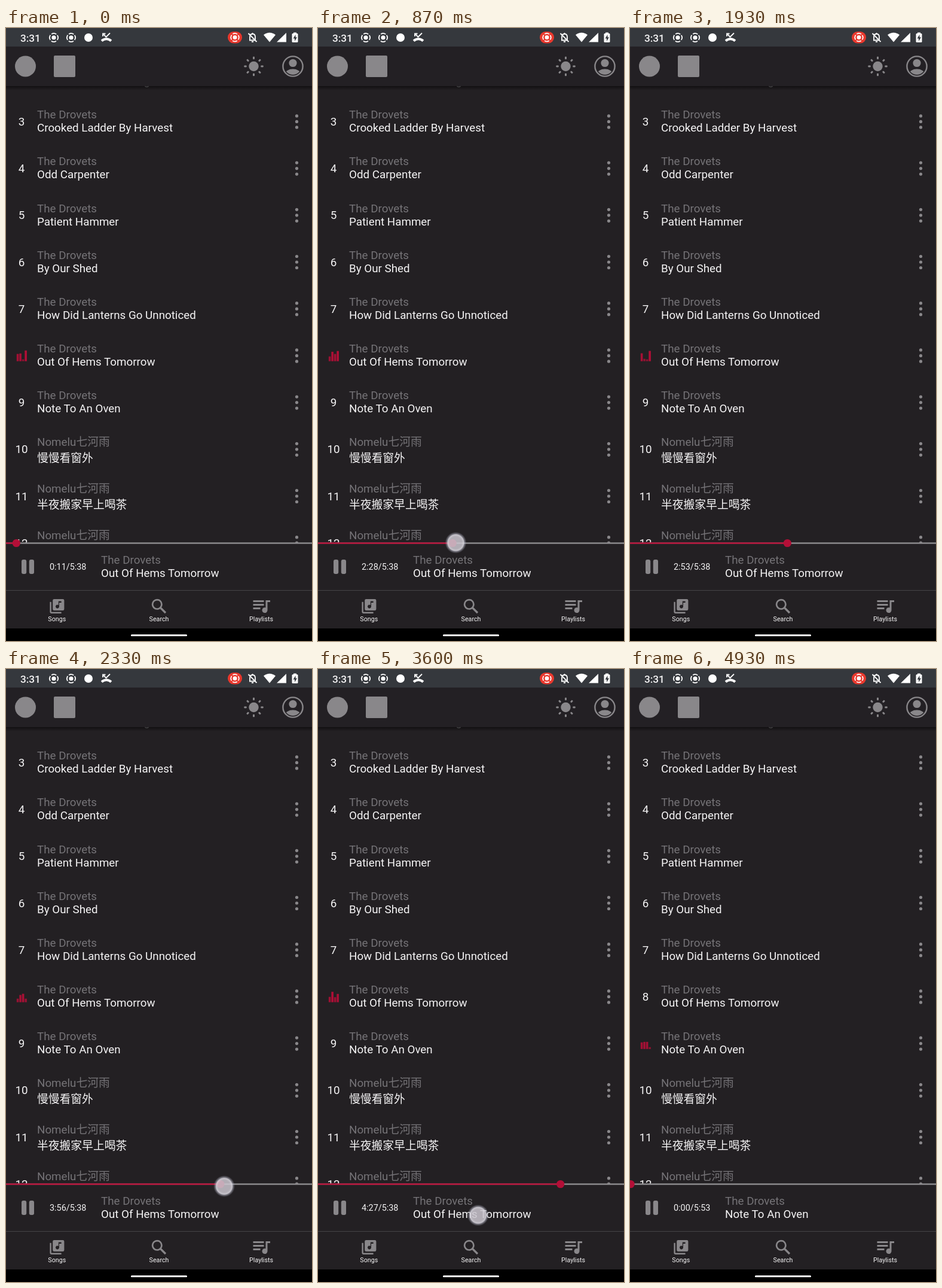
An HTML page that plays this animation: 512 px wide and 1024 px high, repeating every 4.99 s.

```html
<!DOCTYPE html>
<html lang="en">
<head>
<meta charset="utf-8">
<title>Music player</title>
<style>
  html, body { margin: 0; width: 100%; height: 100%; overflow: hidden; background: #232023; }
  svg { display: block; width: 100vw; height: 100vh; }
  text { font: 18.8px Roboto, "Noto Sans CJK SC", "Noto Sans CJK", sans-serif; fill: #f5f4f5; }
  .artist { fill: #757377; }
  .mid { text-anchor: middle; }
  .nav { font-size: 10.7px; text-anchor: middle; }
  .grey { fill: #89878a; }
  .line { fill: none; stroke: #fff; stroke-width: 1.8; }
  .red { fill: #b30f37; }
</style>
</head>
<body>
<svg viewBox="0 0 512 1024">
  <defs>
    <linearGradient id="shade" x2="0" y2="1">
      <stop stop-color="#000" stop-opacity=".5"/>
      <stop offset="1" stop-color="#000" stop-opacity="0"/>
    </linearGradient>
    <radialGradient id="glow">
      <stop offset=".55" stop-color="#cbc6cf" stop-opacity=".85"/>
      <stop offset=".74" stop-color="#dedbe3" stop-opacity=".88"/>
      <stop offset=".8" stop-color="#c4c3d0" stop-opacity=".6"/>
      <stop offset="1" stop-color="#9a9cb0" stop-opacity="0"/>
    </radialGradient>
    <clipPath id="face"><circle cx="480" cy="64" r="14"/></clipPath>
    <g id="recorder">
      <circle class="line" r="7" stroke-dasharray="8.5 2.5" transform="rotate(-35)"/>
      <circle r="3.6" fill="#fff"/>
    </g>
  </defs>

  <rect width="512" height="1024" fill="#232023"/>
  <text x="230.5" y="95" class="artist">g</text>
  <g id="rows"></g>
  <g id="bars" class="red"></g>

  <!-- header -->
  <rect y="97" width="512" height="7" fill="url(#shade)"/>
  <rect y="31" width="512" height="66" fill="#232024"/>
  <g class="grey">
    <circle cx="32.5" cy="64" r="17.5"/>
    <rect x="80" y="46" width="36" height="36" rx="2"/>
    <circle cx="414.5" cy="64" r="8.2"/>
    <g id="rays"></g>
    <circle cx="480" cy="64" r="16.6" fill="none" stroke="#89878a" stroke-width="2.4"/>
    <circle cx="480" cy="58.5" r="6.6"/>
    <ellipse cx="480" cy="77" rx="13" ry="8.5" clip-path="url(#face)"/>
  </g>

  <!-- status bar -->
  <rect width="512" height="31" fill="#35383d"/>
  <text x="24" y="22.5" style="font-size:17.2px;font-weight:500">3:31</text>
  <use href="#recorder" x="80" y="16"/>
  <use href="#recorder" x="109" y="16"/>
  <circle cx="138" cy="16" r="7" fill="#fff"/>
  <path class="line" d="M162 14V9.500h4.500M162.500 10l5 5 6.500-6.500"/>
  <path class="line" stroke-width="4" d="M160 21.500q8-6.500 16 0" style="stroke-width:4"/>
  <rect x="371" y="6" width="24" height="19.500" rx="9.700" fill="#e8382d"/>
  <g transform="translate(383 15.700) scale(.95)"><use href="#recorder"/></g>
  <path class="line" d="M407 20.500h11M408 20v-5q0-5 4.500-5t4.500 5v5M412.500 8v2M411 23h3M405.500 9l14 14"/>
  <path fill="#fff" d="M431 11.500q10-7.500 20 0l-10 12zM469 8v15.500h-16z"/>
  <rect x="478.500" y="9" width="10" height="15" rx="1.500" fill="#fff"/>
  <rect x="481" y="7.500" width="5" height="2" fill="#fff"/>
  <path d="M484.500 11l-4 6.500h2.500v4.500l4-6.500h-2.500z" fill="#35383d"/>

  <!-- player -->
  <rect y="860" width="512" height="164" fill="#232023"/>
  <rect y="859.300" width="512" height="2.500" fill="#8b898c"/>
  <rect id="played" y="859.300" height="2.500" class="red"/>
  <circle id="thumb" cy="860.500" r="6.600" class="red"/>
  <rect x="26" y="888" width="8.200" height="24" rx="3" class="grey"/>
  <rect x="38.800" y="888" width="8.200" height="24" rx="3" class="grey"/>
  <text id="clock" x="73" y="905" style="font-size:14.4px"></text>
  <text x="159" y="895" class="artist">The Drovets</text>
  <text id="song" x="159" y="917"></text>
  <rect id="flash" y="841" width="512" height="39.500" fill="#33b5e5" fill-opacity=".4"/>

  <!-- navigation -->
  <rect y="939" width="512" height="1" fill="#454346"/>
  <g class="grey">
    <path transform="translate(71 951.500) scale(1.200)" d="M20 2H8q-2 0-2 2v12q0 2 2 2h12q2 0 2-2V4q0-2-2-2zm-2 5h-3v5.500a2.500 2.500 0 1 1-1-2V5h4zM4 6H2v14q0 2 2 2h14v-2H4z"/>
    <circle cx="252.800" cy="962.800" r="7.700" fill="none" stroke="#89878a" stroke-width="2.700"/>
    <path d="M258.500 968.500l8.500 8.500" stroke="#89878a" stroke-width="3.200"/>
    <path transform="translate(409 947) scale(1.500)" d="M15 6H3v2h12zm0 4H3v2h12zM3 16h8v-2H3zM17 6v8.200a3 3 0 1 0 2 2.800V8h3V6z"/>
  </g>
  <text class="nav" x="85.300" y="991">Songs</text>
  <text class="nav" x="256" y="991">Search</text>
  <text class="nav" x="427" y="991">Playlists</text>
  <rect y="1003" width="512" height="21" fill="#000"/>
  <rect x="209" y="1013" width="94" height="3" rx="1.500" fill="#fff"/>

  <circle id="touch" r="18" fill="url(#glow)"/>
</svg>

<script>
const LOOP = 4990, STEPS = 75, WIDTH = 512;
const BAND = 'The Drovets', GROUP = 'Nomelu七河雨';
const TITLES = [
  'Crooked Ladder By Harvest', 'Odd Carpenter', 'Patient Hammer', 'By Our Shed',
  'How Did Lanterns Go Unnoticed', 'Out Of Hems Tomorrow', 'Note To An Oven',
  '慢慢看窗外', '半夜搬家早上喝茶', ''
];
const $ = id => document.getElementById(id);

function add(parent, tag, attrs, text = '') {
  const node = document.createElementNS('http://www.w3.org/2000/svg', tag);
  for (const key in attrs) node.setAttribute(key, attrs[key]);
  node.textContent = text;
  return parent.appendChild(node);
}
function set(node, attrs) {
  for (const key in attrs) node.setAttribute(key, attrs[key]);
}

const rowY = n => 156.4 + 78.2 * (n - 3);
const numbers = {};
TITLES.forEach((title, i) => {
  const n = i + 3, y = rowY(n), cjk = n > 9, rows = $('rows');
  numbers[n] = add(rows, 'text', { x: 26, y: y + 6.6, class: 'mid' }, n);
  add(rows, 'text', { x: 52, y: y - (cjk ? 5.8 : 5.2), class: 'artist' }, cjk ? GROUP : BAND);
  add(rows, 'text', { x: 52, y: y + (cjk ? 21 : 16.7) }, title);
  for (const dy of [-9.5, 0, 9.5])
    add(rows, 'circle', { cx: 486.5, cy: y + dy, r: 2.6, class: 'grey' });
});
for (let a = 0; a < 360; a += 45)
  add($('rays'), 'rect', { x: 413, y: 47.8, width: 3, height: 4.4, rx: 1, transform: `rotate(${a} 414.5 64)` });
const bars = [0, 1, 2, 3].map(i => add($('bars'), 'rect', { x: 17.8 + 4.5 * i, width: 3.6 }));

// Linear value of a [time, value] track.
function at(track, t) {
  const i = track.findIndex(key => key[0] > t);
  if (i < 0) return track[track.length - 1][1];
  if (i === 0) return track[0][1];
  const [t0, v0] = track[i - 1], [t1, v1] = track[i];
  return v0 + (v1 - v0) * (t - t0) / (t1 - t0);
}
const zip = (times, values) => times.map((t, i) => [t, values[i]]);
const within = (t, from, to) => t >= from && t < to;

// Each bar bounces once per unit of phase.
const BEATS = [0, 670, 1270, 1930, 2330, 3600, 4930];
const PHASES = [
  [.6, 2, 3, 4.67, 5.8, 8.4, 11.47],
  [1.33, 2.73, 4, 5.93, 6.6, 9.05, 12.6],
  [0, 1, 2.2, 4, 4.73, 7.65, 10.6],
  [1, 2.6, 4, 5.05, 5.8, 8.73, 12]
].map(phases => zip(BEATS, phases));
const bounce = p => 1 - Math.abs(p % 2 - 1);

const SECONDS = [
  [0, 11.4], [480, 11.9], [670, 89.5], [870, 149], [1130, 172.6], [1200, 173.2], [1400, 173.3],
  [2120, 174.05], [2200, 181], [2330, 236.5], [2470, 258], [2600, 266], [2670, 267.1], [2800, 267.1], [3790, 267.98]
];
const TOUCHES = [
  { from: 400, to: 1460,
    x: [[470, 25], [670, 140.5], [870, 231], [1130, 261], [1200, 262]],
    y: [[400, 858], [670, 856], [1200, 866]] },
  { from: 2060, to: 2930,
    x: [[2120, 264], [2200, 280], [2330, 364.5], [2470, 394], [2600, 404], [2670, 405]],
    y: [[2060, 862], [2330, 864], [2600, 865]] },
  { from: 3400, to: 3860,
    x: [[3420, 345], [3600, 266.5], [3730, 190], [3860, 150]],
    y: [[3400, 914], [3600, 912.5], [3860, 914]] }
];

const clock = s => Math.floor(s / 60) + ':' + String(Math.floor(s % 60)).padStart(2, '0');

function draw(t) {
  const track = t < 3700 ? 8 : 9;
  const length = t < 3795 ? 338 : t < 4400 ? 0 : 353;
  const played = t < 3795 ? at(SECONDS, t) : Math.max(0, t - 4400) / 700;
  const x = length ? played / length * WIDTH : 0;
  set($('played'), { width: x });
  set($('thumb'), { cx: x });
  $('clock').textContent = clock(played) + '/' + clock(length);
  $('song').textContent = TITLES[track - 3];
  for (const n of [8, 9]) set(numbers[n], { visibility: n === track ? 'hidden' : 'visible' });

  bars.forEach((bar, i) => {
    const level = bounce(at(PHASES[i], t)), height = 3 + 15 * level;
    set(bar, { y: rowY(track) + 9.2 - height, height, opacity: .75 + .25 * level });
  });

  set($('flash'), { visibility: within(t, 595, 795) || within(t, 2190, 2320) ? 'visible' : 'hidden' });

  const touch = TOUCHES.find(p => within(t, p.from, p.to));
  set($('touch'), { visibility: touch ? 'visible' : 'hidden' });
  if (touch) set($('touch'), {
    cx: at(touch.x, t), cy: at(touch.y, t),
    opacity: Math.min(1, (touch.to - t) / 90)
  });
}

const start = performance.now();
function tick(now) {
  const t = Math.max(0, now - start) % LOOP;
  draw(Math.floor(t / LOOP * STEPS) * LOOP / STEPS + 4);
  requestAnimationFrame(tick);
}
tick(start);
</script>
</body>
</html>
```
